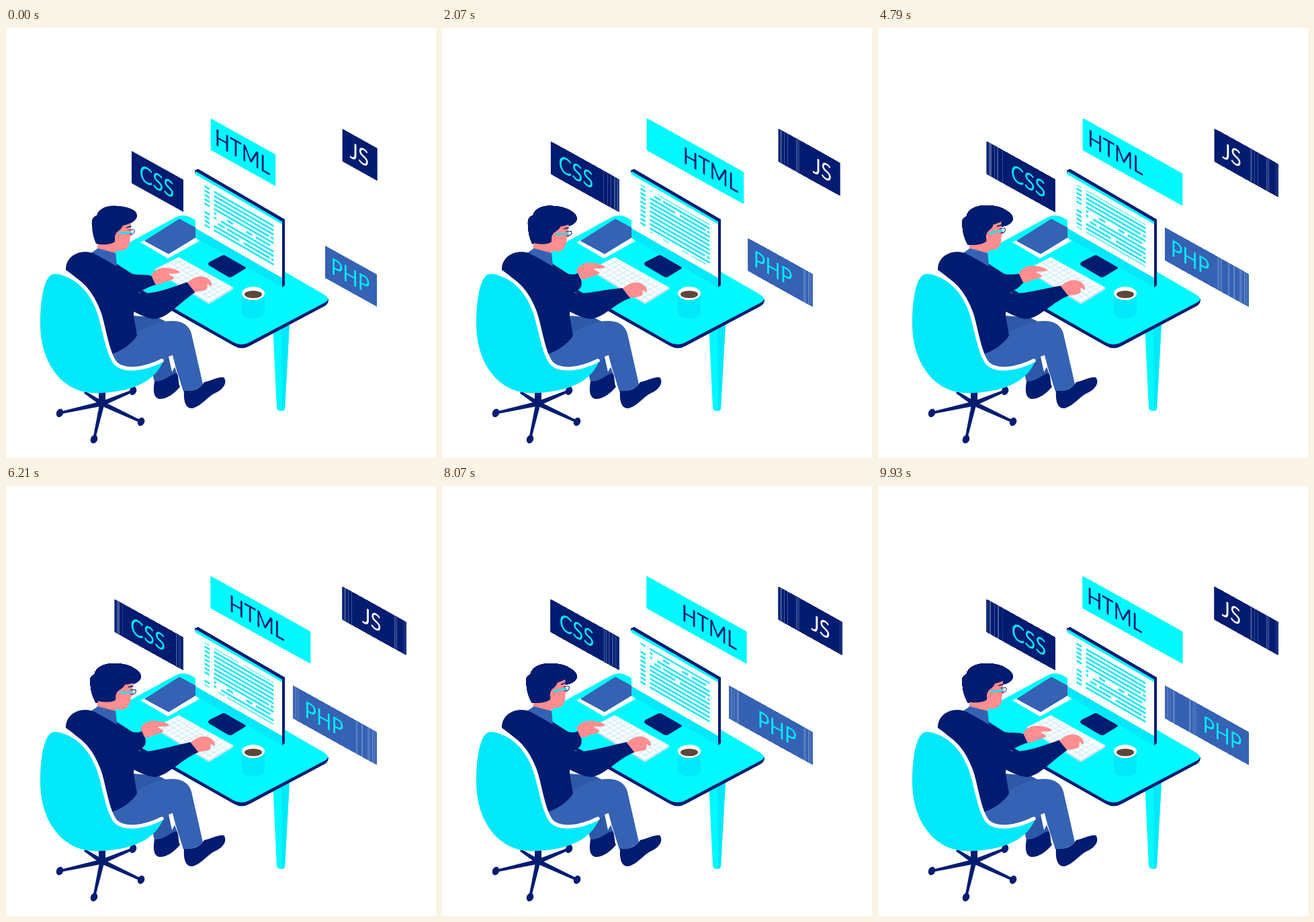
Recreate the animation shown at these times as an HTML page with a canvas. Size 640 px wide and 640 px high, loop 10000 ms.

```html
<!DOCTYPE html>
<html lang="en">
<head>
<meta charset="utf-8">
<title>Developer at a desk</title>
<style>
html, body { margin: 0; width: 100%; height: 100%; overflow: hidden; background: #fff; }
canvas { display: block; width: 100vw; height: 100vh; }
</style>
</head>
<body>
<canvas id="stage" width="640" height="640"></canvas>
<script>
const c = document.getElementById('stage').getContext('2d');
const NAVY = '#001c71', CYAN = '#00f9ff', AQUA = '#00e8f9', BLUE = '#3562b4',
      DEEP = '#2d59a8', SKIN = '#ff8e90', WHITE = '#fff';
const LOOP = 10000, STEPS = 140, SLOPE = 0.556, ISO = 0.577;

const fill = (d, color) => { c.fillStyle = color; c.fill(new Path2D(d)); };
const line = (d, color, width) => {
  c.strokeStyle = color; c.lineWidth = width; c.lineCap = 'round'; c.lineJoin = 'round';
  c.stroke(new Path2D(d));
};
const oval = (x, y, rx, ry, color, turn = 0) => {
  c.fillStyle = color; c.beginPath(); c.ellipse(x, y, rx, ry, turn, 0, 7); c.fill();
};
const ease = p => (1 - Math.cos(Math.PI * p)) / 2;

// Eased value from a list of [second, value] stops
function track(stops, t) {
  let i = 1;
  while (i < stops.length - 1 && t > stops[i][0]) i++;
  const [t0, a] = stops[i - 1], [t1, b] = stops[i];
  return a + (b - a) * ease(Math.min(1, Math.max(0, (t - t0) / (t1 - t0))));
}
const swing = (times, size) => times.map((t, i) => [t, i % 2 ? size : 0]);

const panels = [
  { text: 'CSS',  x: 187, y: 183, w: 77, h: 48, bg: NAVY, ink: AQUA, path: swing([0, 2.2, 4.4, 7.75, 10], -25.3) },
  { text: 'HTML', x: 304.7, y: 134.5, w: 96.5, h: 47, bg: CYAN, ink: NAVY, path: swing([0, 2.53, 5.05, 7.53, 10], 52) },
  { text: 'JS',   x: 500.7, y: 150, w: 52, h: 48.5, bg: NAVY, ink: WHITE, path: swing([0, 2.5, 5, 7.5, 10], 43) },
  { text: 'PHP',  x: 475, y: 324, w: 77, h: 48, bg: BLUE, ink: AQUA, path: swing([0, 4.65, 10], -48) }
];
const nod = [[0, 0], [1.45, 7], [2.1, 4], [3.6, -4], [4.85, -4], [5.9, 7], [6.3, 4], [7.8, -4], [9, -4], [9.65, 0], [10, 0]];
const reach = [[0, 0], [0.6, 1], [4.6, 1], [4.93, 0], [5, 0]];
const tapX = [[0, 0], [0.7, 5], [1.3, 5], [1.9, -1], [2.2, -1], [2.8, 5], [3.2, 5], [3.7, 0], [4.7, 3], [4.93, 0], [5, 0]];
const tapY = [[0, 0], [0.7, 3], [1.3, 3], [1.9, 9], [2.2, 9], [2.8, 3], [3.2, 3], [3.7, 9], [4.7, 8], [4.93, 0], [5, 0]];

// Panels smear over the places they have passed since the loop began
function drawPanel(p, n) {
  let off = 0;
  for (let k = 0; k <= n; k++) {
    off = track(p.path, k * LOOP / STEPS / 1000);
    c.save();
    c.transform(1, SLOPE, 0, 1, p.x + off, p.y + off * SLOPE);
    c.fillStyle = p.bg;
    c.fillRect(0, 0, p.w, p.h);
    const part = (p.x + off + 100) % 1;
    if (part > 0.65 && p.bg !== CYAN && k < n) {
      c.fillStyle = `rgba(255,255,255,${part * 0.42})`;
      c.fillRect(0.2, 0, 0.8, p.h);
      c.fillRect(p.w - 1, 0, 0.8, p.h);
    }
    c.restore();
  }
  c.save();
  c.transform(1, SLOPE, 0, 1, p.x + off, p.y + off * SLOPE);
  c.translate(p.w / 2 - 1, p.h / 2 + 12.2);
  c.scale(Math.cos(Math.PI / 6), 1);
  c.font = '34px Lato, sans-serif';
  c.textAlign = 'center';
  c.fillStyle = p.ink;
  c.fillText(p.text, 0, 0);
  c.restore();
}

const rows = {
  0: [[0, .04], [.22, .32], [.54, .64], [.7, .94]],
  1: [[0, .04], [.12, 1]],
  2: [[.07, .18], [.22, 1]],
  3: [[0, .42], [.5, .93], [.96, 1]],
  9: [[0, .92], [.95, 1]]
};

function drawCode(t) {
  const gap = 70 / 11;
  c.save();
  c.transform(1, ISO, 0, 1, 309.5, 0);
  c.beginPath();
  c.rect(-16, 241, 106, 63);
  c.clip();
  c.fillStyle = AQUA;
  for (let k = 0; k < 11; k++) {
    const y = 236 + (38 + 14 * t + gap * k) % 70;
    if (k) c.fillRect(-14, y, 7.5, 2.8);
    for (const [a, b] of rows[k] || [[0, 1]]) c.fillRect(a * 89, y, (b - a) * 89, 2.8);
  }
  c.restore();
}

function drawKeyboard() {
  fill('M222 359L222 362L302 411L338 389V386Z', '#cfe3ee');
  fill('M222 359L257 341L338 386L302 408Z', '#f8fdff');
  c.save();
  c.transform(80 / 12, 49 / 12, 7, -3.6, 222, 359);
  c.beginPath();
  for (let i = 1; i < 12; i++) { c.moveTo(i, 0.3); c.lineTo(i, 4.7); }
  for (let j = 1; j < 5; j++) { c.moveTo(0.3, j); c.lineTo(11.7, j); }
  c.restore();
  c.strokeStyle = '#cdeaf2';
  c.lineWidth = 1.1;
  c.stroke();
}

function drawDesk(t) {
  fill('M397 440L403 566Q404 570 409 570Q414 570 415 566L422 440Z', CYAN);
  fill('M410 440L411 570Q415 569 415 566L422 440Z', AQUA);
  fill('M160 340V372L339 473Q351 480 363 473L474 414Q480 411 480 404L470 396Z', NAVY);
  fill('M160 332L252 282Q263 276 275 282L474 397Q484 404 474 409L362 468Q351 474 339 468L160 366Z', CYAN);
  fill('M200 319L206 316L242 336L282 312L288 317L241 343Z', WHITE);
  fill('M206 317L258 284L282 297V312L242 336.5Z', BLUE);
  fill('M282 297L411 371V386L282 312Z', AQUA);
  fill('M281 212L286 210L415 285V383L411 386V289L281 215Z', NAVY);
  fill('M282 216L411 290V372L282 298Z', WHITE);
  fill('M282 213L411 287V292L282 218Z', CYAN);
  fill('M281 212L286 210L415 285L411 288Z', NAVY);
  drawCode(t);
  fill('M303 348L321 339Q324 337 327 339L355 355Q359 357 355 359L337 370Q334 372 330 370L303 354Q299 351 303 348Z', NAVY);
  drawKeyboard();
  fill('M351 395V422C351 436 385 436 385 422V395Z', AQUA);
  oval(368, 395, 17, 10, WHITE);
  oval(368, 396.5, 13, 5.5, '#5f4639');
}

function drawLegs() {
  fill('M188 428L226 431L244 440L190 462Z', DEEP);
  fill('M216 506L244 485L256 518L222 531Z', DEEP);
  fill('M221 526C236 527 244 515 254 514C258 520 256 530 259 534C250 545 238 553 228 552C219 550 219 538 221 526Z', NAVY);
  fill('M156 486C175 468 200 444 235 437C258 433 272 440 276 455L293 530C288 537 276 541 264 541L247 487C232 499 205 514 180 512C165 510 158 498 156 486Z', BLUE);
  fill('M242 489L248 487L252 503L247 512Z', WHITE);
  fill('M265 540C280 541 290 536 295 527C305 525 318 518 324 520C330 527 324 538 312 543C300 548 292 562 278 566C267 567 264 555 265 540Z', NAVY);
}

function drawArms(t) {
  const s = t % 5, r = track(reach, s);
  const fx = -16 * r, fy = -7.5 * r, nx = track(tapX, s), ny = track(tapY, s);
  fill(`M160 348L188 366C196 368 205 366 ${217 + fx} ${369 + fy}L${223 + fx} ${382 + fy}C210 386 205 390 192 396L165 385Z`, NAVY);
  c.save();
  c.translate(fx, fy);
  fill('M216 368C222 358 232 356 240 357C250 358 258 361 259 364C255 366 248 365 242 366C244 369 252 370 250 373C244 377 238 377 232 380C229 382 225 382 222 381Z', SKIN);
  c.restore();
  fill('M89 360C89 340 108 329 130 335L166 354C180 362 190 378 192 398L190 428L195 458C186 472 170 481 156 486C150 465 148 440 140 420C127 392 112 376 89 360Z', NAVY);
  fill(`M140 362C160 364 182 385 200 395C218 396 240 389 ${270 + nx} ${378 + ny}L${282 + nx} ${393 + ny}C262 406 240 432 222 433C203 433 175 412 150 400Z`, NAVY);
  c.save();
  c.translate(nx, ny);
  fill('M270 379C277 372 286 369 292 370C298 370 307 376 306 383C305 385 303 384 301 381C298 380 301 386 299 388C296 392 290 391 281 393Z', SKIN);
  c.restore();
}

const hair = 'M128 294C127 285 129 281 135 279C138 268 152 263 166 265C174 265 180 267 183 268C191 270 196 275 195 281C193 288 184 292 174 294C172 301 164 302 163 308L162 318C156 323 142 323 134 321C130 312 128 303 128 294Z';
function tilt(deg, draw) {
  c.save();
  c.translate(155, 328);
  c.rotate(deg * Math.PI / 180);
  c.translate(-155, -328);
  draw();
  c.restore();
}

function drawHead(t, n) {
  for (let k = 0; k < n; k++) tilt(track(nod, k * LOOP / STEPS / 1000), () => fill(hair, NAVY));
  fill('M127 335L137 328L163 335L165 355L146 345Z', BLUE);
  fill('M138 314L135 330C143 338 157 338 166 332L168 322Z', SKIN);
  tilt(track(nod, t), () => {
    fill('M160 293L186 288L186 302C188 305 189 308 185 310L184 319C182 328 177 333 167 331L150 322Z', SKIN);
    fill(hair, NAVY);
    oval(166, 311, 4, 6, SKIN, 0.15);
    line('M166 308Q169 310 167 314', '#e8747c', 1);
    line('M168 306L186 304', AQUA, 2.6);
    line('M183 301L190 300Q192 301 191 304Q189 308 184 307', NAVY, 1);
    line('M180 297L186 295', NAVY, 1.6);
  });
}

function drawChair() {
  const hub = [143, 559];
  fill('M138 536H148V562H138Z', NAVY);
  for (const [x, y] of [[80, 573], [131, 612], [201, 586], [189, 540], [117, 542]]) {
    const a = Math.atan2(y - hub[1], x - hub[0]), dx = 3.6 * Math.sin(a), dy = 3.6 * Math.cos(a);
    fill(`M${hub[0] + dx} ${hub[1] - dy}L${x + dx / 2} ${y - dy / 2}L${x - dx / 2} ${y + dy / 2}L${hub[0] - dx} ${hub[1] + dy}Z`, NAVY);
    if (x !== 117) oval(x, y, 5, 6.5, NAVY, 0.4);
  }
  fill('M72 366C92 366 119 382 134 417C147 450 150 481 162 501C175 514 205 510 234 496C222 525 190 542 135 543.5C85 544 51 500 51 440C51 400 58 366 72 366Z', AQUA);
  line('M86 366C107 373 127 390 139 425C148 455 151 483 163 499C177 513 208 507 232 495', WHITE, 5.5);
}

function draw(n) {
  const t = n * LOOP / STEPS / 1000;
  c.fillStyle = WHITE;
  c.fillRect(0, 0, 640, 640);
  panels.forEach(p => drawPanel(p, n));
  drawDesk(t);
  drawLegs();
  drawHead(t, n);
  drawArms(t);
  fill('M128 334L137 328L163 335L165 355L150 346Z', BLUE);
  drawChair();
}

let start = null, shown = -1;
function tick() {
  const now = performance.now();
  if (start === null) start = now;
  const n = Math.floor((now - start) % LOOP / LOOP * STEPS + 0.02) % STEPS;
  if (n !== shown) draw(shown = n);
  requestAnimationFrame(tick);
}
tick();
</script>
</body>
</html>
```
